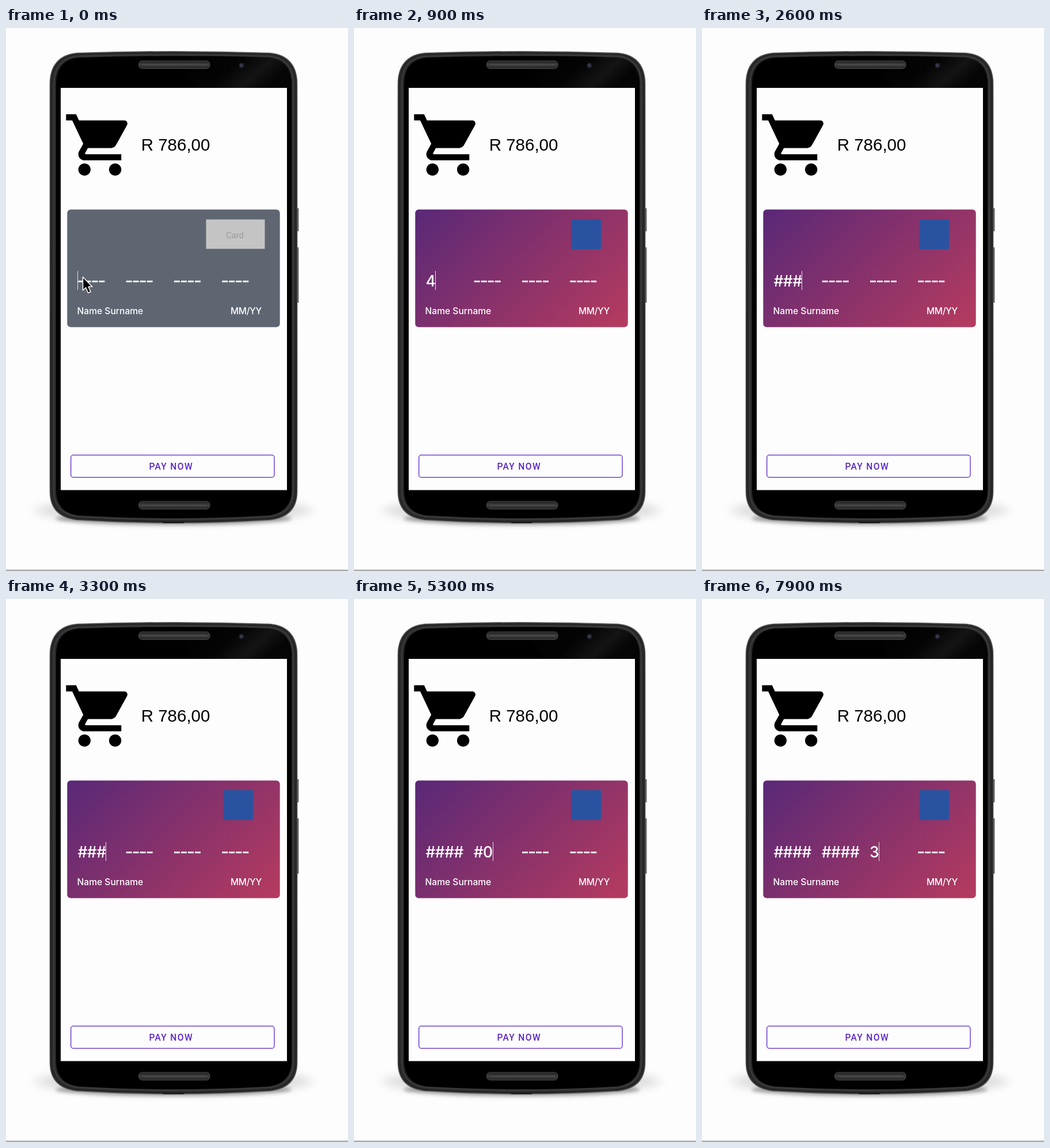
These frames come from a looping animation (594x943 px, 8 s). An HTML page:

```html
<!DOCTYPE html>
<html lang="en">
<head>
<meta charset="utf-8">
<title>Card payment form</title>
<style>
  html, body { margin: 0; width: 100%; height: 100%; overflow: hidden; background: #fefdfe; }
  svg { display: block; width: 100%; height: 100%; }
  .helvetica { font-family: "Liberation Sans", Arial, sans-serif; }
  .roboto { font-family: Roboto, sans-serif; }
  .inter { font-family: Inter, "Open Sans", sans-serif; fill: #fff; }
  .digits { font-size: 26.5px; font-weight: 500; }
  .label { font-size: 15.6px; font-weight: 500; }
</style>
</head>
<body>
<svg viewBox="0 0 594 943">
  <defs>
    <linearGradient id="cardFill" gradientUnits="userSpaceOnUse" x1="148" y1="274" x2="434" y2="561">
      <stop stop-color="#592877"/><stop offset="1" stop-color="#b63b5f"/>
    </linearGradient>
    <linearGradient id="edge" x2="0" y2="1">
      <stop stop-color="#5c5c5e"/><stop offset=".1" stop-color="#444446"/>
      <stop offset=".9" stop-color="#3c3c3e"/><stop offset="1" stop-color="#6c6c6e"/>
    </linearGradient>
    <linearGradient id="gloss" x1="0" x2="1" y1="0" y2=".3">
      <stop stop-color="#000"/><stop offset=".55" stop-color="#040404"/>
      <stop offset=".8" stop-color="#141415"/><stop offset="1" stop-color="#050505"/>
    </linearGradient>
    <linearGradient id="grille" x2="0" y2="1">
      <stop stop-color="#202021"/><stop offset=".5" stop-color="#3d3d3e"/><stop offset="1" stop-color="#242425"/>
    </linearGradient>
    <filter id="soft" x="-10%" y="-100%" width="120%" height="300%"><feGaussianBlur stdDeviation="3"/></filter>
    <filter id="softer" x="-20%" y="-100%" width="140%" height="300%"><feGaussianBlur stdDeviation="11 8"/></filter>
  </defs>

  <rect width="594" height="943" fill="#fefdfe"/>

  <!-- Phone -->
  <ellipse cx="291" cy="838" rx="240" ry="22" opacity=".13" filter="url(#softer)"/>
  <ellipse cx="291" cy="852" rx="205" ry="11" opacity=".34" filter="url(#soft)"/>
  <path d="M505 313h3.500v40h-3.500zM505 381h3.500v96h-3.500z" fill="#6b6b6d"/>
  <path d="M76.500 97C76.500 66 92 46 124 43.500Q291 38 458 43.500C490 46 505.500 66 505.500 97V805C505.500 834 490 851 458 854.500Q291 865 124 854.500C92 851 76.500 834 76.500 805Z" fill="#262627" stroke="url(#edge)" stroke-width="1.500"/>
  <path d="M83 97C83 70 96 51 125 49Q291 43.500 457 49C486 51 499 70 499 97V804C499 829 486 845 457 848.500Q291 858.500 125 848.500C96 845 83 829 83 804Z" fill="none" stroke="#38383a" stroke-width="3"/>
  <path d="M87 98C87 71 99 54 126 51.500Q291 46 456 51.500C483 54 496 71 496 98V802C496 827 483 843 456 846.500Q291 856 126 846.500C99 843 87 827 87 802Z"/>
  <path d="M290 49Q390 48 456 51.500C483 54 495 71 495 98V104H330Z" fill="url(#gloss)"/>
  <g fill="url(#grille)" stroke="#4b4b4c">
    <rect x="230.500" y="57" width="123.500" height="13.500" rx="6"/>
    <rect x="230.500" y="822" width="123.500" height="13.500" rx="6"/>
  </g>
  <path d="M236 63.500H349M236 829H349" stroke="#464647" stroke-width="3"/>
  <circle cx="409" cy="65" r="4.500" fill="#222431"/>
  <circle cx="408.500" cy="65" r="2" fill="#41455f"/>
  <path d="M270 857.500H312L308 860H274Z" fill="#1b1b1b"/>
  <rect x="95" y="104" width="393" height="698.500" fill="#fefdfe"/>

  <!-- Basket total -->
  <path transform="translate(99 139.200) scale(5.330)" d="M1 2v2h2l3.600 7.590-1.350 2.450c-.16.280-.25.610-.25.960 0 1.100.9 2 2 2h12v-2H7.420c-.14 0-.25-.11-.25-.25l.03-.12.9-1.630h7.450c.75 0 1.410-.41 1.750-1.030l3.580-6.490c.08-.14.12-.31.12-.48 0-.55-.45-1-1-1H5.210l-.94-2zM5 20a2 2 0 1 0 4 0a2 2 0 1 0-4 0zM15 20a2 2 0 1 0 4 0a2 2 0 1 0-4 0z"/>
  <text class="helvetica" x="234.700" y="213" font-size="29.500">R 786,00</text>

  <!-- Card -->
  <rect id="card" x="106.300" y="315.200" width="369.400" height="204.300" rx="6"/>
  <g id="blankBadge">
    <rect x="347.500" y="332.500" width="102" height="51" fill="#c5c4c5"/>
    <text class="roboto" x="397.500" y="365" text-anchor="middle" font-size="14.500" fill="#98999b">Card</text>
  </g>
  <rect id="brandBadge" x="377" y="332" width="52" height="52" fill="#2953a0"/>
  <g id="number"></g>
  <text class="inter label" x="123.500" y="497">Name Surname</text>
  <text class="inter label" x="390" y="497" letter-spacing="-.4">MM/YY</text>
  <path id="caret" d="M0 422V455" stroke="#e3dfe6"/>
  <path id="pointer" d="M133.500 432.500V455.500L138.700 450.700L142.600 460L147 458.200L143.100 449.200H149.800Z" stroke="#fff" stroke-width="1.500" stroke-linejoin="round"/>

  <!-- Button -->
  <rect x="112.700" y="741.700" width="353.300" height="38.600" rx="4" fill="none" stroke="#5a27c2" stroke-width="1.300"/>
  <text class="roboto" x="248.500" y="767" font-size="15.600" letter-spacing="1.400" font-weight="500" fill="#5a27c2">PAY NOW</text>

  <path d="M0 941.700H594" stroke="#6c6c6e" stroke-width="1.300"/>
</svg>
<script>
const LOOP = 8000, BLINK = 500, MASK_DELAY = 100, JUMP_DELAY = 200;
const GROUP_START = 124.4, GROUP_PITCH = 83.3, GROUP_SIZE = 4;
const keys = [
  [900, '4'], [1600, '7'], [2300, '1'], [3600, '0'],
  [4800, '5'], [5300, '0'], [5600, '1'], [6300, '2'],
  [7900, '3']
];
const $ = id => document.getElementById(id);
const show = (node, on) => { node.style.display = on ? '' : 'none'; };
const create = (name, attrs) => {
  const node = document.createElementNS('http://www.w3.org/2000/svg', name);
  for (const key in attrs) node.setAttribute(key, attrs[key]);
  return $('number').appendChild(node);
};
const advance = char => char === '#' ? 16.4 : char === '2' ? 14.5 : 16.9;

const groups = [0, 1, 2, 3].map(i => {
  const x = GROUP_START + GROUP_PITCH * i;
  return {
    x,
    dashes: create('path', {
      d: `M${x + 1} 440.200h46`, stroke: '#fff',
      'stroke-width': 2.7, 'stroke-dasharray': '10 2'
    }),
    text: create('text', { class: 'inter digits', y: 449 })
  };
});

function render(t) {
  const typed = keys.filter(([time]) => time <= t);
  const count = typed.length;
  const last = count ? typed[count - 1][0] : -250;
  const age = t - last;
  const chars = typed.map(([, digit], i) =>
    i < count - 1 || age >= MASK_DELAY ? '#' : digit);
  const groupFull = count > 0 && count % GROUP_SIZE === 0;
  const jumped = groupFull && age >= JUMP_DELAY;
  const active = Math.floor(count / GROUP_SIZE) - (groupFull && !jumped ? 1 : 0);
  let caretX = 0;

  groups.forEach(({ x, dashes, text }, i) => {
    const part = chars.slice(i * GROUP_SIZE, (i + 1) * GROUP_SIZE);
    let end = x;
    const places = part.map(char => {
      const place = end;
      end += advance(char);
      return place;
    });
    show(dashes, !part.length);
    text.textContent = part.join('');
    text.setAttribute('x', places.join(' ') || x);
    if (i === active) caretX = Math.floor(end) + 0.5;
  });

  const blinkAge = jumped ? age - JUMP_DELAY : age;
  $('caret').setAttribute('transform', `translate(${caretX})`);
  show($('caret'), Math.floor(blinkAge / BLINK) % 2 === 0);
  show($('pointer'), !count);
  show($('blankBadge'), !count);
  show($('brandBadge'), count);
  $('card').setAttribute('fill', count ? 'url(#cardFill)' : '#5f6672');
}

const start = performance.now();
function tick() {
  render((performance.now() - start) % LOOP);
  requestAnimationFrame(tick);
}
tick();
</script>
</body>
</html>
```
